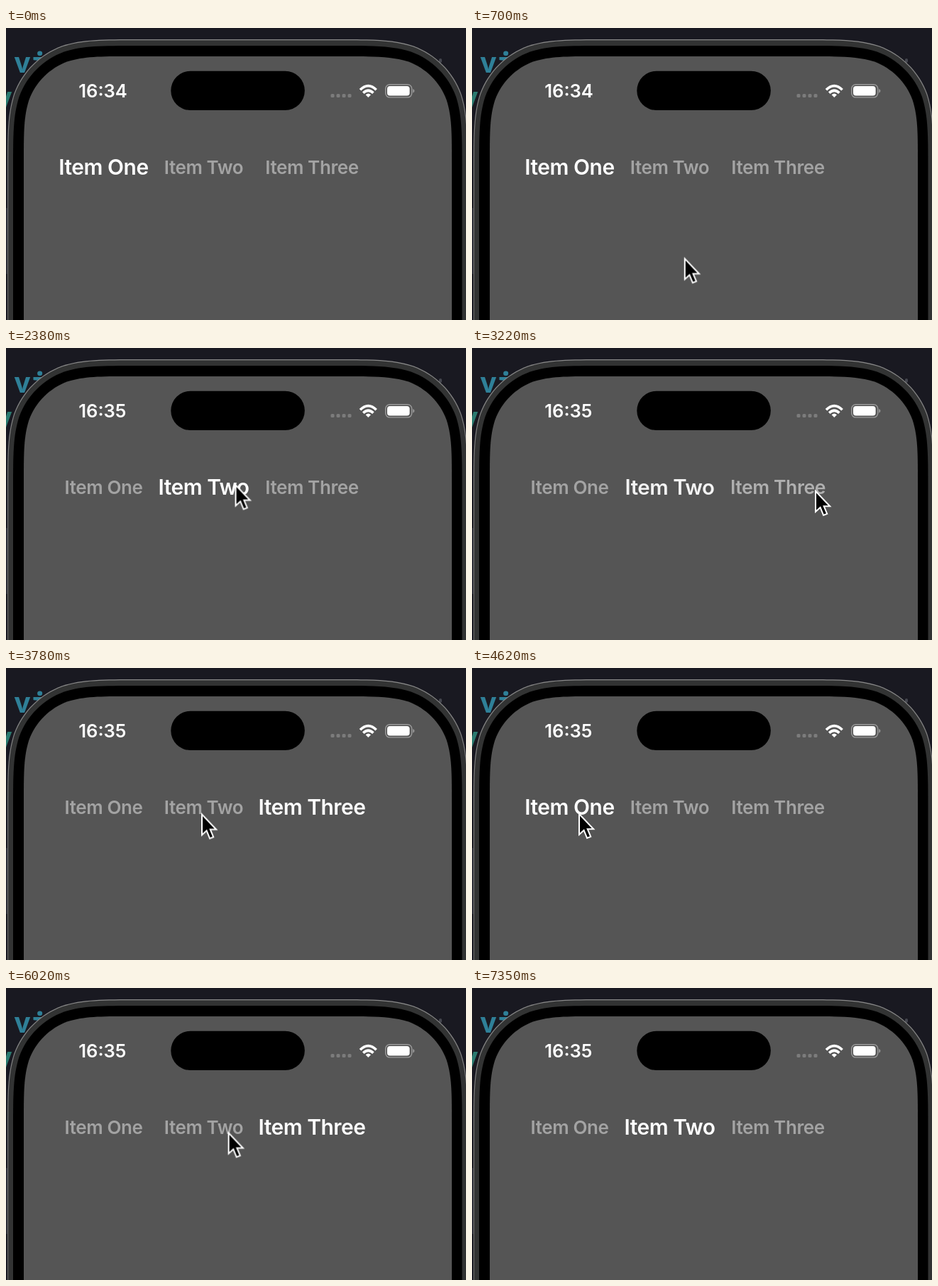
Recreate the animation shown at these times as an HTML page. Size 648x412 px, loop 7.63 s.

```html
<!DOCTYPE html>
<html lang="en">
<head>
<meta charset="utf-8">
<title>Tab selection</title>
<style>
  html, body { margin: 0; width: 100%; height: 100%; overflow: hidden; background: #191921; }
  svg { display: block; width: 648px; height: 412px; }
  text { font-family: Inter, Roboto, sans-serif; }
  .code { font: 600 40px "Noto Sans Mono", "DejaVu Sans Mono", monospace; }
  .clock { font-size: 25.6px; font-weight: 600; fill: #fff; }

  .item {
    font-size: 26px; font-weight: 600; letter-spacing: -.4px; text-anchor: middle;
    fill: #fff; fill-opacity: .46;
    animation: 7630ms ease-in-out infinite;
  }
  .one   { transform-origin: 137.5px 196.5px; animation-name: one; }
  .two   { transform-origin: 278.5px 196.5px; animation-name: two; }
  .three { transform-origin: 431px 196.5px; animation-name: three; }

  @keyframes one {
    0%, 25.69%, 60.55%, 73.39% { transform: scale(1.15); fill-opacity: 1; }
    29.36%, 56.88%, 77.06%, 100% { transform: none; fill-opacity: .46; }
  }
  @keyframes two {
    0%, 25.69%, 44.95%, 79.6% { transform: none; fill-opacity: .46; }
    29.36%, 41.28%, 82.57%, 100% { transform: scale(1.15); fill-opacity: 1; }
  }
  @keyframes three {
    0%, 41.28%, 60.55%, 73.39%, 82.57%, 100% { transform: none; fill-opacity: .46; }
    44.95%, 56.88%, 77.06%, 79.6% { transform: scale(1.15); fill-opacity: 1; }
  }

  .before, .after { animation: 7630ms step-end infinite; }
  .before { animation-name: before; }
  .after { animation-name: after; }
  @keyframes before { 0% { opacity: 1; } 25.69%, 100% { opacity: 0; } }
  @keyframes after { 0% { opacity: 0; } 25.69%, 100% { opacity: 1; } }

  .cursor { animation: cursor 7630ms linear infinite; }
  @keyframes cursor {
    0%, 6.4% { transform: translate(305px, 416px); animation-timing-function: ease-in; }
    10.09% { transform: translate(295px, 269px); animation-timing-function: ease-out; }
    16.5%, 28.4% { transform: translate(287.5px, 197.5px); animation-timing-function: ease-in; }
    31.19% { transform: translate(322px, 191.5px); animation-timing-function: ease-out; }
    34.86%, 37.6% { transform: translate(392px, 189px); animation-timing-function: ease-in-out; }
    39.45%, 44.5% { transform: translate(483px, 200px); animation-timing-function: ease-in; }
    49.54% { transform: translate(276px, 204.5px); animation-timing-function: ease-out; }
    51.38%, 53.2% { transform: translate(198px, 205px); animation-timing-function: ease-in-out; }
    56%, 62.4% { transform: translate(150px, 204px); animation-timing-function: ease-in-out; }
    70.64%, 76.4% { transform: translate(399px, 202.5px); animation-timing-function: ease-in-out; }
    78.9% { transform: translate(313px, 202.5px); animation-timing-function: ease-out; }
    80.7%, 84.4% { transform: translate(280px, 206px); animation-timing-function: ease-in; }
    89%, 100% { transform: translate(281px, 416px); }
  }
</style>
</head>
<body>
<svg viewBox="0 0 648 412">
  <linearGradient id="shine" x2="0" y2="1">
    <stop stop-color="#8a8a8a"/>
    <stop offset="1" stop-color="#666"/>
  </linearGradient>
  <rect width="648" height="412" fill="#191921"/>
  <text class="code" x="11" y="63" fill="#2f8098">vi</text>
  <text class="code" x="-15" y="112" fill="#2b7b70">v</text>
  <rect x="610" y="43" width="4" height="6" rx="2" fill="#44464e"/>
  <rect y="254" width="2" height="93" fill="#2c2d36"/>

  <path id="edge" fill="url(#shine)"/>
  <path id="frame" fill="#323333"/>
  <path id="bezel" fill="#000"/>
  <path id="screen" fill="#555"/>

  <rect x="232.3" y="60.7" width="188.5" height="55.3" rx="27.6"/>

  <text class="clock before" x="102.2" y="98">16:34</text>
  <text class="clock after" x="102.2" y="98">16:35</text>

  <g fill="#7c7c7c">
    <rect x="457.5" y="93" width="5" height="5" rx="1.6"/>
    <rect x="465.5" y="93" width="5" height="5" rx="1.6"/>
    <rect x="473.5" y="93" width="5" height="5" rx="1.6"/>
    <rect x="481.5" y="93" width="5" height="5" rx="1.6"/>
  </g>

  <g fill="none" stroke="#fff" stroke-width="3.7">
    <path d="M499 87.2Q510.3 76 521.6 87.2"/>
    <path d="M503.2 91.6Q510.3 84.9 517.4 91.6"/>
    <path d="M506.6 94.2Q510.3 90.9 514 94.2L510.3 98Z" fill="#fff" stroke="none"/>
  </g>

  <rect x="534.7" y="79.7" width="37" height="18.2" rx="5.8" fill="none" stroke="#9b9b9b" stroke-width="1.4"/>
  <rect x="537" y="82" width="31.6" height="13.6" rx="3.8" fill="#fff"/>
  <path d="M573.3 86Q575.4 86.6 575.4 88.8T573.3 91.6Z" fill="#9b9b9b"/>

  <text class="item one" x="137.5" y="206">Item One</text>
  <text class="item two" x="278.5" y="206">Item Two</text>
  <text class="item three" x="431" y="206">Item Three</text>

  <g class="cursor">
    <path d="M1 2V31L7.6 24.9L12.1 36L17.2 33.9L12.7 23.2H21.2Z"
          stroke="#fff" stroke-width="2"/>
  </g>
</svg>
<script>
  // Continuous-curvature corners at the top; the body runs off the stage.
  function body(id, left, top, right, r) {
    const at = (x, y) => `${x * r + left} ${y * r + top}`;
    const to = (x, y) => `${right - x * r} ${y * r + top}`;
    const curve = [[0, 1.529], [0, 1.088], [0, .868], [.075, .631],
      [.169, .373], [.373, .169], [.631, .075], [.868, 0], [1.088, 0], [1.529, 0]];
    const first = curve.map(p => at(...p));
    const second = curve.map(p => to(...p)).reverse();
    const d = `M${left} 420L${first[0]}C${first.slice(1).join(" ")}` +
      `L${second[0]}C${second.slice(1).join(" ")}V420Z`;
    document.getElementById(id).setAttribute("d", d);
  }
  body("edge", 2, 16, 650.5, 122);
  body("frame", 3.2, 17.2, 649.3, 121);
  body("bezel", 10, 25, 642.5, 114);
  body("screen", 25, 40, 628, 98);
</script>
</body>
</html>
```
